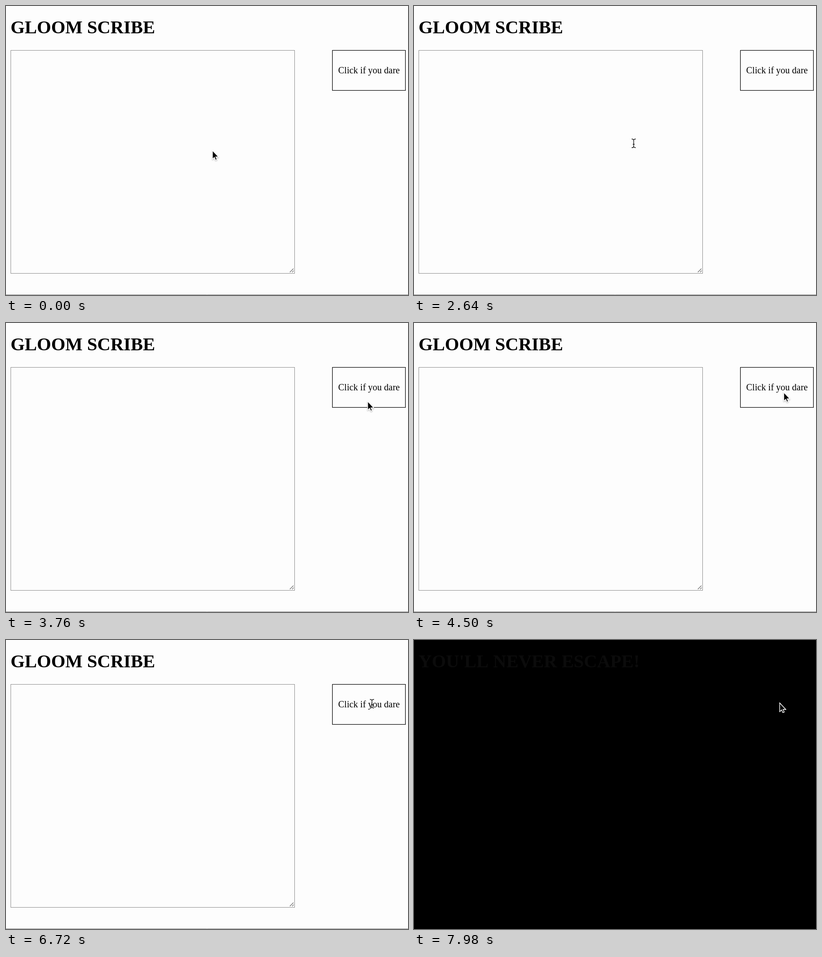
An HTML page with a canvas for the animation above (8000 ms loop, 881 by 635 pixels).

```html
<!DOCTYPE html>
<html lang="en">
<head>
<meta charset="utf-8">
<title>Gloom Scribe</title>
<style>
html, body { margin: 0; width: 100%; height: 100%; overflow: hidden; background: #fdfdfd; }
canvas { display: block; }
</style>
</head>
<body>
<canvas id="stage" width="881" height="635"></canvas>
<script>
const ctx = document.getElementById('stage').getContext('2d');
const LOOP = 8000, BLACKOUT = 6740, FADE = 7400;
const SERIF = '"Liberation Serif", "Times New Roman", serif';

const linear = u => u;
const easeIn = u => Math.pow(u, 1.5);
const easeOut = u => u * (2 - u);

// Pointer stops: time, x, y, easing towards this stop
const path = [
  [2340, 452.5, 317.5, linear],
  [2640, 481, 302, easeIn],
  [3100, 700, 210, linear],
  [3190, 701, 210, linear],
  [3760, 792.5, 172.5, easeOut],
  [3920, 806.5, 157.5, easeOut],
  [4030, 806.5, 157.5, linear],
  [4500, 810.5, 152.5, easeOut],
  [4750, 810.5, 152.5, linear],
  [5480, 804, 149, linear],
  [5570, 804, 149, linear],
  [5900, 802, 141, easeOut],
  [6030, 802, 141, linear],
  [6720, 802, 140, linear]
];

function pointerAt(t) {
  if (t <= path[0][0]) return path[0].slice(1, 3);
  for (let i = 1; i < path.length; i++) {
    const [t1, x1, y1, ease] = path[i];
    if (t > t1) continue;
    const [t0, x0, y0] = path[i - 1];
    const k = ease((t - t0) / (t1 - t0));
    return [x0 + (x1 - x0) * k, y0 + (y1 - y0) * k];
  }
  return path[path.length - 1].slice(1, 3);
}

function text(str, x, y, font, color) {
  ctx.font = font + ' ' + SERIF;
  ctx.fillStyle = color;
  ctx.fillText(str, x, y);
}

function line(color, width, ...pts) {
  ctx.strokeStyle = color;
  ctx.lineWidth = width;
  ctx.beginPath();
  for (let i = 0; i < pts.length; i += 2) ctx.lineTo(pts[i], pts[i + 1]);
  ctx.stroke();
}

function box(x, y, w, h, color, width) {
  ctx.strokeStyle = color;
  ctx.lineWidth = width;
  ctx.strokeRect(x, y, w, h);
}

function arrow(x, y, shadow) {
  const shape = new Path2D('M0 0V18.8L4.2 15L6.8 21L9.8 19.8L7.2 14H13.2Z');
  ctx.save();
  ctx.translate(x, y);
  ctx.lineJoin = 'miter';
  ctx.lineWidth = 1.3;
  ctx.strokeStyle = '#fff';
  ctx.fillStyle = '#000';
  if (shadow) {
    ctx.shadowColor = 'rgba(0,0,0,.4)';
    ctx.shadowBlur = 3;
    ctx.shadowOffsetY = 1.5;
  }
  ctx.stroke(shape);
  ctx.shadowColor = 'transparent';
  ctx.fill(shape);
  ctx.stroke(shape);
  ctx.restore();
}

function beam(x, y) {
  const shape = new Path2D(
    'M-4.5 -9.5Q0 -9.5 0 -6.5Q0 -9.5 4.5 -9.5M0 -7V7' +
    'M-4.5 9.5Q0 9.5 0 6.5Q0 9.5 4.5 9.5M-2 2H2');
  ctx.save();
  ctx.translate(x, y);
  ctx.strokeStyle = 'rgba(255,255,255,.7)';
  ctx.lineWidth = 3;
  ctx.stroke(shape);
  ctx.strokeStyle = '#111';
  ctx.lineWidth = 1.4;
  ctx.stroke(shape);
  ctx.restore();
}

function drawPage(t) {
  ctx.fillStyle = '#fdfdfd';
  ctx.fillRect(0, 0, 881, 635);
  text('GLOOM SCRIBE', 10, 60, 'bold 40px', '#000');
  box(10.5, 97.5, 622, 490, '#8c8c8c', 1);
  line('#666', 1.1, 622, 585, 630, 577);
  line('#666', 1.1, 627, 585, 630.5, 581.5);
  box(715.4, 97.5, 160, 88, '#000', 1.2);
  text('Click if you dare', 728, 148, '20px', '#000');
  line('#808080', 1, 0, 634.5, 881, 634.5);

  const [x, y] = pointerAt(t);
  const overField = t > path[0][0] && x < 633;
  const overLabel = x > 728 && y < 152;
  if (overField || overLabel) beam(x, y);
  else arrow(x, y, true);
}

function drawDark(t) {
  ctx.fillStyle = '#000';
  ctx.fillRect(0, 0, 881, 635);
  if (t > FADE) {
    const v = Math.round(11 * (t - FADE) / (LOOP - FADE));
    text("YOU'LL NEVER ESCAPE!", 10, 60, 'bold 40px', `rgb(${v},${v},${v})`);
  }
  arrow(801.5, 138.5, false);
}

const start = performance.now();
function frame() {
  const t = (performance.now() - start) % LOOP;
  if (t < BLACKOUT) drawPage(t);
  else drawDark(t);
  requestAnimationFrame(frame);
}
frame();
</script>
</body>
</html>
```
